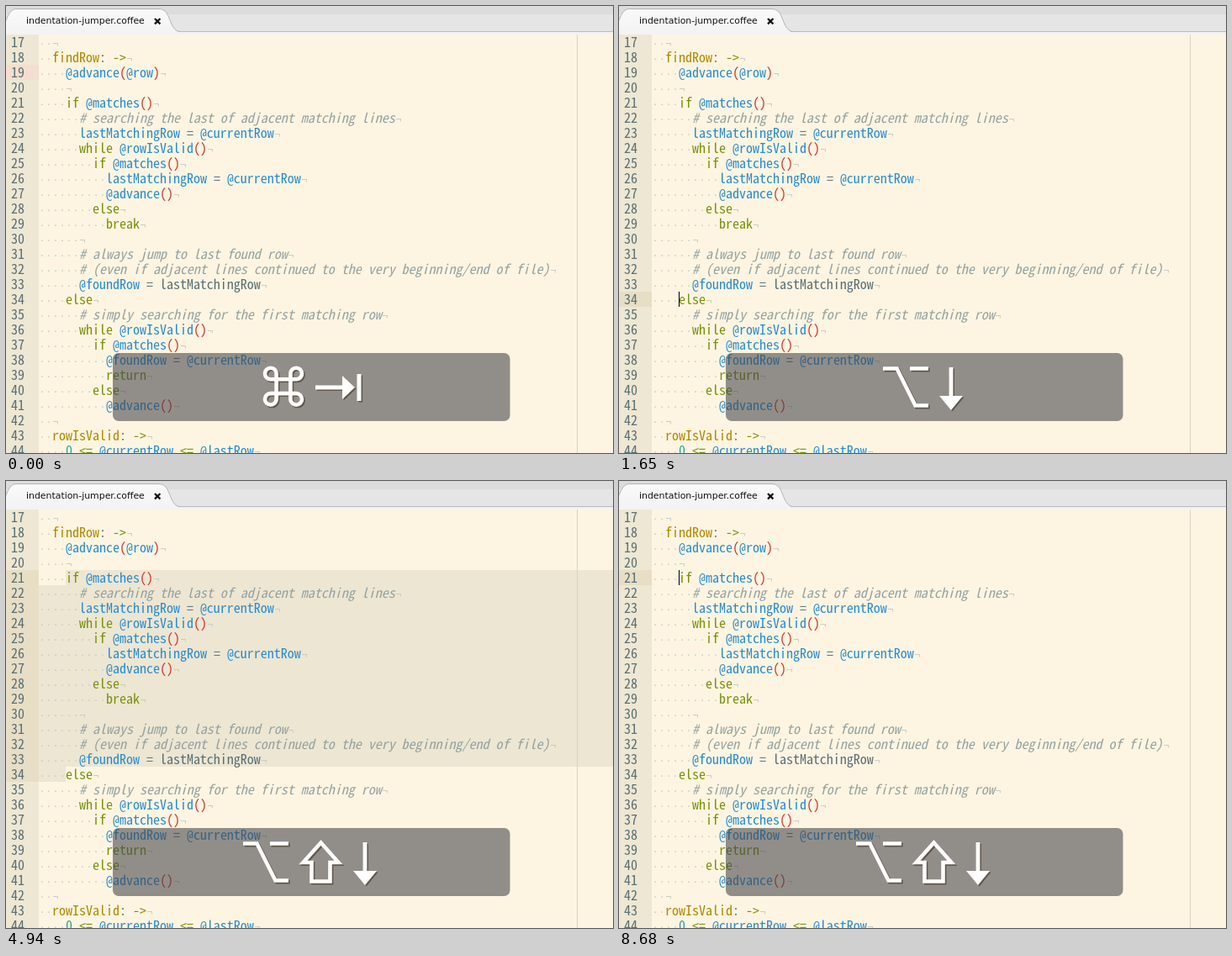
Recreate the animation shown at these times as an HTML page. Size 722 px wide and 532 px high, loop 8990 ms.

```html
<!DOCTYPE html>
<html lang="en">
<head>
<meta charset="utf-8">
<title>Indentation jumper</title>
<style>
html, body { margin: 0; width: 100%; height: 100%; overflow: hidden; background: #fdf5e1; }
svg { display: block; }
text { white-space: pre; }
.code { font-family: "Noto Sans Mono CJK JP", "Noto Sans Mono", monospace; font-size: 16px; fill: #657b83; }
.mark { font-family: "Noto Sans Mono", monospace; font-size: 13.333px; fill: #c3cac6; }
.num { fill: #586e75; }
.comment { fill: #93a1a1; font-style: italic; }
.key { fill: #78900a; }
.var { fill: #268bd2; }
.paren { fill: #d8302a; }
.name { fill: #b08700; }
.digit { fill: #2aa198; }
.plain { fill: #586e75; }
.title { font: 10.9px "DejaVu Sans", sans-serif; fill: #111; }
.line { fill: none; stroke-width: 4.6; }
</style>
</head>
<body>
<svg id="stage" width="722" height="532" viewBox="0 0 722 532">
  <defs>
    <linearGradient id="tabFill" x2="0" y2="1">
      <stop offset="0" stop-color="#fafafa"/>
      <stop offset="1" stop-color="#f3f3f3"/>
    </linearGradient>
    <g id="opt"><path class="line" stroke="currentColor" d="M0 4.5H16.5L38.5 48.5H54M32 4.5H54"/></g>
    <g id="shift"><path class="line" stroke="currentColor" d="M26.5 4.5L5.5 28H15.5V50.5H37.5V28H47.5Z"/></g>
    <g id="up"><path fill="currentColor" d="M14 0L28 17H16.4V51H11.6V17H0Z"/></g>
    <g id="down"><path fill="currentColor" d="M14 55L28 38H16.4V4H11.6V38H0Z"/></g>
    <g id="cmd"><path class="line" stroke="currentColor" d="M9.8 17.3H40.2A6.8 6.8 0 1 0 33.4 10.5V40.9A6.8 6.8 0 1 0 40.2 34.1H9.8A6.8 6.8 0 1 0 16.6 40.9V10.5A6.8 6.8 0 1 0 9.8 17.3Z"/></g>
    <g id="tab"><path fill="currentColor" d="M0 25.5H32V14L47 28L32 42V30.5H0ZM49.5 12H54.5V44H49.5Z"/></g>
  </defs>

  <rect width="722" height="532" fill="#fdf5e1"/>
  <rect y="34" width="39" height="498" fill="#eee7d3"/>
  <g id="gutter"></g>
  <path id="selection" fill="#ede6d2"/>
  <rect x="679" y="34" width="1" height="498" fill="#d8d1be"/>
  <g id="code"></g>
  <rect id="cursor" x="71" width="1" height="18" fill="#000"/>

  <rect width="722" height="10" fill="#dcdcdc"/>
  <rect y="10" width="722" height="21" fill="#e5e5e5"/>
  <rect y="30" width="722" height="1" fill="#b9b9b9"/>
  <rect y="31" width="722" height="3" fill="#f3f3f3"/>
  <path d="M-10 31.5C0 30 0 3.5 12 3.5H182C197 3.5 193 30 208 31.5Z" fill="url(#tabFill)"/>
  <path d="M-10 30.5C0 29 0 3.5 12 3.5H182C197 3.5 193 29 207 30.5" fill="none" stroke="#b4b4b4"/>
  <text class="title" x="24" y="21">indentation-jumper.coffee</text>
  <path d="M177 15L183.4 21.4M183.4 15L177 21.4" stroke="#111" stroke-width="2.3"/>

  <g id="overlay">
    <rect x="127" y="413" width="472.5" height="81" rx="7" fill="#44464a" fill-opacity=".58"/>
    <g id="keys"></g>
  </g>
</svg>
<script>
const FIRST = 17, ROW = 18, TOP = 34, COL = 8, LEFT = 39, LOOP = 8990;
const lines = `
  findRow: ->
    @advance(@row)
    
    if @matches()
      # searching the last of adjacent matching lines
      lastMatchingRow = @currentRow
      while @rowIsValid()
        if @matches()
          lastMatchingRow = @currentRow
          @advance()
        else
          break
      
      # always jump to last found row
      # (even if adjacent lines continued to the very beginning/end of file)
      @foundRow = lastMatchingRow
    else
      # simply searching for the first matching row
      while @rowIsValid()
        if @matches()
          @foundRow = @currentRow
          return
        else
          @advance()
  
  rowIsValid: ->
    0 <= @currentRow <= @lastRow`.split("\n");
lines[0] = "  ";

const $ = id => document.getElementById(id);
const rowY = row => TOP + (row - FIRST) * ROW;
const esc = s => s.replace(/</g, "&lt;").replace(/>/g, "&gt;");

const tokens = /(?<comment>#.*)|(?<key>\b(?:if|while|else|break|return)\b|->|<=)|(?<var>@\w+|\w+(?= =))|(?<paren>[()])|(?<name>\w+(?=:))|(?<digit>\b\d+\b)|(?<plain>\w+)/g;

function paint(src) {
  return src.replace(tokens, (m, ...rest) => {
    const groups = rest[rest.length - 1];
    const kind = Object.keys(groups).find(k => groups[k]);
    return `<tspan class="${kind}">${esc(m)}</tspan>`;
  });
}

function textAt(cls, col, y, body) {
  return `<text class="${cls}" x="${LEFT + col * COL}" y="${y}">${body}</text>`;
}

$("code").innerHTML = lines.map((line, i) => {
  const y = rowY(FIRST + i) + 14.5;
  const src = line.trimStart(), indent = line.length - src.length;
  return `<text class="code num" x="6" y="${y}">${FIRST + i}</text>` +
    textAt("mark", 0, y, "·".repeat(indent)) +
    textAt("code", indent, y, paint(src)) +
    textAt("mark", line.length, y, "¬");
}).join("");

// Keep the character grid at 8px whichever monospace face is present.
for (const cls of ["code", "mark"]) {
  const probe = document.createElementNS("http://www.w3.org/2000/svg", "text");
  probe.setAttribute("class", cls);
  probe.textContent = "0".repeat(20);
  $("stage").append(probe);
  const size = parseFloat(getComputedStyle(probe).fontSize) * 20 * COL / probe.getComputedTextLength();
  probe.remove();
  document.querySelectorAll("." + cls).forEach(t => t.style.fontSize = size + "px");
}

// Key hints: [symbol, x, y]
const hints = {
  none: [],
  switch: [["cmd", 305, 427], ["tab", 368, 426]],
  opt: [["opt", 335, 427]],
  optUp: [["opt", 314, 427], ["up", 381, 426]],
  optDown: [["opt", 314, 427], ["down", 381, 426]],
  optShift: [["opt", 303, 427], ["shift", 369, 426]],
  optShiftUp: [["opt", 282, 427], ["shift", 348, 426], ["up", 413, 426]],
  optShiftDown: [["opt", 282, 427], ["shift", 348, 426], ["down", 413, 426]]
};
const hintTimes = [
  [0, "switch"], [150, "none"], [750, "opt"], [900, "optDown"], [2540, "optUp"],
  [4190, "optDown"], [4940, "optShiftDown"], [5990, "optShiftUp"],
  [7790, "optShift"], [7930, "optShiftDown"]
];
// Caret or selection: [time, first row, last row]
const rowTimes = [
  [0, 19, 19], [900, 21, 21], [1650, 34, 34], [2540, 21, 21], [3290, 19, 19],
  [4190, 21, 21], [4940, 21, 34], [5990, 21, 21], [6740, 19, 21], [7930, 21, 21]
];
const blinkTimes = [
  [0, 0], [300, 1], [750, 0], [900, 1], [1350, 0], [1650, 1], [2090, 0], [2540, 1],
  [2990, 0], [3290, 1], [3740, 0], [4190, 1], [4490, 0], [5990, 1], [6290, 0],
  [7930, 1], [8230, 0], [8680, 1]
];

const at = (table, t) => table.findLast(entry => entry[0] <= t);

function drawHint(name) {
  const use = ([id, x, y], d, color) => `<use href="#${id}" x="${x + d}" y="${y + d}" color="${color}"/>`;
  $("overlay").style.display = name === "none" ? "none" : "";
  $("keys").innerHTML = hints[name].map(k => use(k, 1.6, "#62574c")).join("") +
    hints[name].map(k => use(k, 0, "#fff")).join("");
}

function drawRows([time, a, b]) {
  const y1 = rowY(a), y2 = rowY(b), color = time === 0 ? "#f3decf" : "#e7dec5";
  $("gutter").innerHTML = `<rect y="${y1}" width="39" height="${y2 - y1 + ROW}" fill="${color}"/>`;
  $("selection").setAttribute("d", a === b ? "" :
    `M71 ${y1}H722V${y2}H71V${y2 + ROW}H39V${y1 + ROW}H71Z`);
  $("cursor").setAttribute("y", y1);
}

let hint, rows;
const start = performance.now();
function frame() {
  const t = (performance.now() - start) % LOOP;
  const h = at(hintTimes, t), r = at(rowTimes, t);
  if (h !== hint) drawHint((hint = h)[1]);
  if (r !== rows) drawRows(rows = r);
  $("cursor").style.opacity = at(blinkTimes, t)[1];
  requestAnimationFrame(frame);
}
frame();
</script>
</body>
</html>
```
